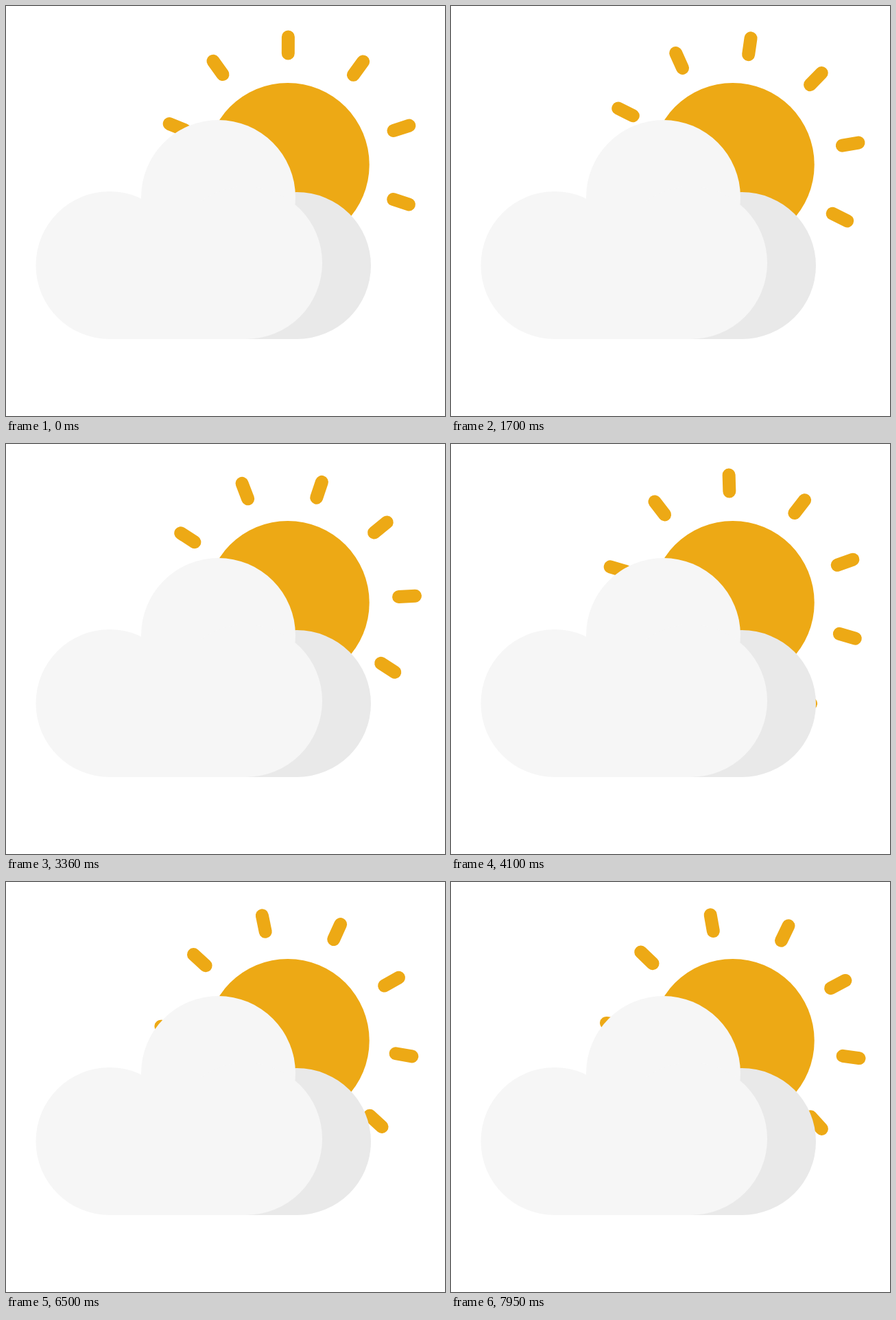
An HTML page for the animation above (8000 ms loop, 640 by 597 pixels).

```html
<!DOCTYPE html>
<html lang="en">
<head>
<meta charset="utf-8">
<title>Sun behind a cloud</title>
<style>
  html, body { margin: 0; width: 100%; height: 100%; overflow: hidden; background: #fff; }
  svg { display: block; width: 100%; height: 100%; }
</style>
</head>
<body>
<svg viewBox="0 0 640 597">
  <g transform="translate(410.75 231)">
    <circle r="119" fill="#eda915"/>
    <g id="rays" stroke="#eda915" stroke-width="19" stroke-linecap="round"></g>
  </g>
  <g fill="#e9e9e9">
    <ellipse cx="424" cy="378" rx="108" ry="107"/>
    <rect x="340" y="300" width="84" height="185"/>
  </g>
  <g fill="#f6f6f6">
    <circle cx="151" cy="377.5" r="107.5"/>
    <circle cx="309.5" cy="278.5" r="112.5"/>
    <circle cx="350" cy="374" r="111"/>
    <rect x="151" y="290" width="199" height="195"/>
  </g>
</svg>
<script>
  const LOOP = 8000;
  const STEP = 41.43;           // ms per rotation step
  const STEP_ANGLE = 360 / 336; // one turn takes 336 steps
  const START_ANGLE = 0.2;
  const RAY_COUNT = 10;
  const TILTED_RAY = 8;         // sits slightly closer to the sun and askew

  const rays = document.getElementById('rays');

  function addRay(angle, radius, tilt) {
    const ray = document.createElementNS('http://www.w3.org/2000/svg', 'line');
    ray.setAttribute('y1', -12);
    ray.setAttribute('y2', 12);
    ray.setAttribute('transform', `rotate(${angle}) translate(0 ${-radius}) rotate(${tilt})`);
    rays.append(ray);
  }

  for (let i = 0; i < RAY_COUNT; i++) {
    const angle = i * 360 / RAY_COUNT;
    if (i === TILTED_RAY) addRay(angle + 0.6, 170.5, 3);
    else addRay(angle, 174, 0);
  }

  function draw(now) {
    const step = Math.floor((now % LOOP) / STEP + 0.15);
    rays.setAttribute('transform', `rotate(${START_ANGLE + step * STEP_ANGLE})`);
    requestAnimationFrame(draw);
  }
  draw(0);
</script>
</body>
</html>
```
